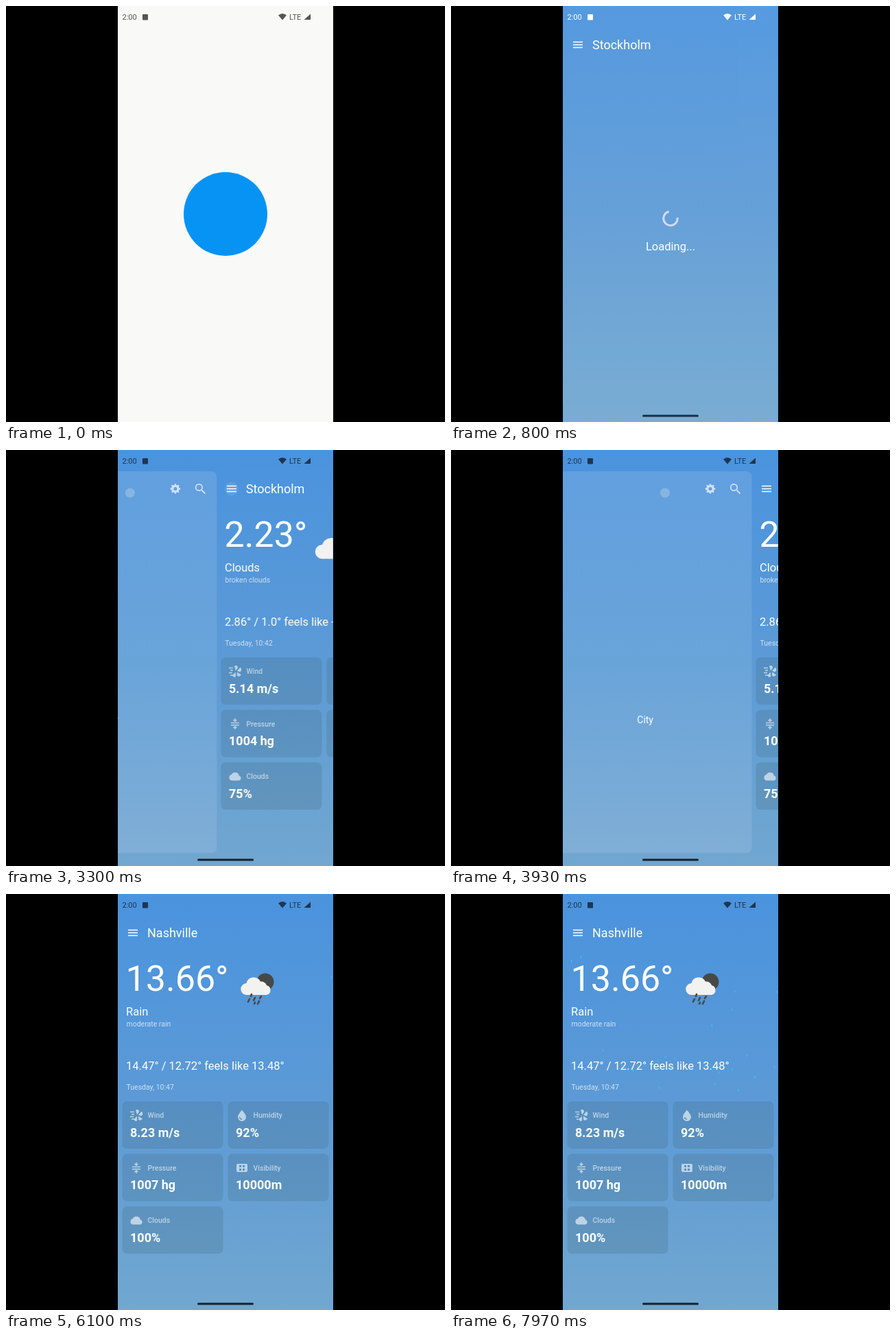
Write an HTML page that moves like this. It is 640 by 606 pixels and loops after 8000 ms.

```html
<!DOCTYPE html>
<html lang="en">
<head>
<meta charset="utf-8">
<title>Weather app</title>
<style>
html, body { margin: 0; width: 100%; height: 100%; overflow: hidden; background: #000; }
svg { display: block; width: 640px; height: 606px; font-family: Roboto, sans-serif; }
.title { font-size: 18px; fill: #fff; }
.temp { font-size: 52px; fill: #fff; }
.body { font-size: 16.5px; fill: #fff; }
.small { font-size: 10.5px; fill: #cfe1f3; }
.label { font-size: 10.5px; font-weight: 500; fill: #bdd3e6; }
.value { font-size: 18px; font-weight: 700; fill: #fff; }
.icon { fill: #bdd3e6; stroke: #bdd3e6; stroke-width: 0; }
.line { fill: none; stroke-width: 1.5; }
.card { fill: rgba(70, 110, 130, .25); }

svg * { animation: 8s linear infinite; }
#logo { animation-name: logo; }
@keyframes logo { 0%, 5.05% { opacity: 1; animation-timing-function: cubic-bezier(.15, 0, 1, 1); } 6.7%, 100% { opacity: 0; } }

#app { animation-name: rise; }
@keyframes rise {
  0%, 6.0875% { transform: translateY(6px); animation-timing-function: cubic-bezier(0, 0, .4, 1); }
  9.4125%, 100% { transform: none; }
}
#sky { animation-name: sky; }
@keyframes sky { 0%, 6% { opacity: 0; } 7.875% { opacity: .57; } 10.4%, 100% { opacity: 1; } }

#status { fill: #555; animation-name: tint; }
@keyframes tint { 0%, 6.1% { fill: #555; } 7.3%, 10.6% { fill: #fff; } 12.1%, 100% { fill: #1f3550; } }
#pill { animation-name: pill; }
@keyframes pill { 0%, 6.1% { opacity: 0; } 7.875% { opacity: .52; } 10.5%, 100% { opacity: 1; } }

#slide { animation-name: slide; }
@keyframes slide {
  0%, 40.1125% { transform: none; animation-timing-function: cubic-bezier(.4, 0, .2, 1); }
  43.3125%, 62.95% { transform: translateX(275px); animation-timing-function: cubic-bezier(.4, 0, .2, 1); }
  66.15%, 100% { transform: none; }
}
#ripple { animation-name: ripple; transform-origin: 185px 56.5px; }
@keyframes ripple {
  0%, 38.5% { opacity: 0; transform: scale(.4); }
  39.5% { opacity: .1; }
  44.1% { opacity: .1; transform: none; }
  49.1%, 100% { opacity: 0; transform: none; }
}

#loading, #cityA, #cityB, #dayA, #dayB, #dayA .sky, #dayB .sky { animation-timing-function: step-end; }
#loading { animation-name: loading; }
@keyframes loading { 0% { opacity: 1; } 25% { opacity: 0; } 63.2% { opacity: 1; } 72.5%, 100% { opacity: 0; } }
#cityA { animation-name: cityA; }
@keyframes cityA { 0% { opacity: 1; } 63.2%, 100% { opacity: 0; } }
#cityB { animation-name: cityB; }
@keyframes cityB { 0% { opacity: 0; } 63.2%, 100% { opacity: 1; } }
#dayA { animation-name: dayA; }
@keyframes dayA { 0% { opacity: 0; } 25% { opacity: 1; } 63.2%, 100% { opacity: 0; } }
#dayB { animation-name: dayB; }
@keyframes dayB { 0% { opacity: 0; } 72.5%, 100% { opacity: 1; } }
#dayA .sky { animation-name: iconA; }
@keyframes iconA { 0% { opacity: 0; } 30.375%, 100% { opacity: 1; } }
#dayB .sky { animation-name: iconB; }
@keyframes iconB { 0% { opacity: 0; } 75%, 100% { opacity: 1; } }
</style>
</head>
<body>
<svg viewBox="0 0 640 606">
  <defs>
    <clipPath id="phone"><rect x="163.5" width="313" height="606"/></clipPath>
    <linearGradient id="blue" x2="0" y2="1">
      <stop stop-color="#4a93de"/><stop offset=".5" stop-color="#5c9ad6"/><stop offset="1" stop-color="#71a7d0"/>
    </linearGradient>
    <linearGradient id="panel" x2="0" y2="1">
      <stop stop-color="#629fdf"/><stop offset=".5" stop-color="#69a4d9"/><stop offset="1" stop-color="#80aed6"/>
    </linearGradient>
    <radialGradient id="hole" gradientUnits="userSpaceOnUse" cx="320" cy="0" r="0">
      <stop offset=".8" stop-color="#f9f9f8" stop-opacity="0"/><stop offset="1" stop-color="#f9f9f8"/>
    </radialGradient>
  </defs>
  <rect width="640" height="606"/>
  <g clip-path="url(#phone)">
    <rect x="163" width="314" height="606" fill="#f9f9f8"/>
    <g id="app">
      <rect id="sky" x="163" width="314" height="606" fill="url(#blue)"/>
      <g id="slide">
        <g id="drawer">
          <path d="M-120 31H155.500a8 8 0 0 1 8 8V579a8 8 0 0 1-8 8H-120Z" fill="url(#panel)"/>
          <circle cx="37" cy="62.500" r="7" fill="#86b5e2"/>
          <path id="gear" fill="#cfe1f5" fill-rule="evenodd"/>
          <path d="M141.500 58.500l5 5" stroke="#cfe1f5" stroke-width="1.800"/>
          <circle cx="137.500" cy="54.500" r="4.700" fill="none" stroke="#cfe1f5" stroke-width="1.700"/>
          <text x="20" y="398" text-anchor="end" font-size="14" fill="#fff">City</text>
        </g>
        <circle id="ripple" cx="185" cy="56.500" r="14.500" fill="#fff"/>
        <path d="M178 52.500h14M178 56.500h14M178 60.500h14" stroke="#fff" stroke-width="1.600"/>
        <text id="cityA" class="title" x="206" y="62.500">Stockholm</text>
        <text id="cityB" class="title" x="206" y="62.500">Nashville</text>
        <g id="loading">
          <path id="spin" fill="none" stroke="#cfdcf6" stroke-width="3"/>
          <text class="body" x="320" y="356" text-anchor="middle">Loading...</text>
        </g>
        <g id="dayA"></g>
        <g id="dayB"></g>
      </g>
    </g>
    <rect x="163" width="314" height="606" fill="url(#hole)"/>
    <circle id="logo" cx="320" cy="303" r="61" fill="#0793f4"/>
    <rect id="pill" x="279" y="595.500" width="82" height="3" rx="1.500" fill="#14212e"/>
    <g id="status" font-size="11">
      <text x="169.500" y="20">2:00</text>
      <rect x="199" y="12" width="8" height="8.500" rx="1"/>
      <path d="M397 13.500Q403 8.500 409 13.500L403 20.500ZM444 11.500V20H434.500Z"/>
      <text x="413" y="20">LTE</text>
    </g>
  </g>
</svg>
<script>
const $ = id => document.getElementById(id);
const cloud = 'M-5 6A4.300 4.300 0 0 1-5.300-2.400A6 6 0 0 1 6-1A3.600 3.600 0 0 1 5.500 6Z';
const icons = {
  Wind: `<path class="line" d="M-9-5h6M-7-1.500h4M-9 2h5M-7 5.500h4"/>
    <path d="M1-1L-1-8Q4-10 4-5ZM3-1L8-6Q11-1 7 1ZM3 1L9 5Q6 9 3 6ZM1 1L1 8Q-4 9-3 5Z"/>`,
  Humidity: `<path d="M0-8C3-4 6-1 6 2.500A6 6 0 0 1-6 2.500C-6-1-3-4 0-8Z"/>
    <path class="line" style="stroke:#538cc0" d="M-3.500 2.500Q-3 5.500 0 5.800"/>`,
  Pressure: '<path class="line" d="M-6-1.500h12M-6 1.700h12M0-8v4M-2.500-6L0-3.700 2.500-6M0 8V4M-2.500 6L0 3.700 2.500 6"/>',
  Visibility: `<path fill-rule="evenodd" d="M-6-6H6Q8-6 8-4V4Q8 6 6 6H-6Q-8 6-8 4V-4Q-8-6-6-6Z
    M-4-4v3h3v-3ZM1-4v3h3v-3ZM-4 1v3h3v-3ZM1 1v3h3v-3Z"/>`,
  Clouds: `<path d="${cloud}"/>`
};
const skies = {
  broken: `<path d="M330 143a11 11 0 0 1 9-16a12 12 0 0 1 20 5a8 8 0 0 1-1 16Z" fill="#484848"/>
    <path d="M317 158.500a10.200 10.200 0 0 1 0-20.400A14 14 0 0 1 343 136a11.300 11.300 0 0 1 1 22.500Z" fill="#f2f2f0"/>`,
  rain: `<circle cx="378" cy="128" r="12.500" fill="#484848"/>
    <path d="M351 147a8.500 8.500 0 0 1-.5-17A11 11 0 0 1 371 127.500A9 9 0 0 1 380 133A7.200 7.200 0 0 1 380 147Z" fill="#f2f2f0"/>
    <path d="M358 146l-1 3M355 153l-2 4M363 151l-2 4M372 149l-2 3M363 158l-1 2M369 156l-2 4" stroke="#484848" stroke-width="2.600" stroke-linecap="round"/>`
};

function card(name, value, i) {
  const x = 169.5 + i % 2 * 154, y = 302 + (i >> 1) * 76.5;
  return `<g transform="translate(${x} ${y})"><rect class="card" width="147" height="69" rx="7"/>
    <g class="icon" transform="translate(20.500 20.500)">${icons[name]}</g>
    <text class="label" x="37" y="24">${name}</text>
    <text class="value" x="11.500" y="51.500">${value}</text></g>`;
}
function day(temp, kind, detail, feels, time, sky, values) {
  return `<text class="temp" x="174.500" y="140.500">${temp}</text><g class="sky">${skies[sky]}</g>
    <text class="body" x="175" y="177">${kind}</text><text class="small" x="175.500" y="193">${detail}</text>
    <text class="body" x="175" y="256">${feels}</text><text class="small" x="175.500" y="284.500">${time}</text>
    ${['Wind', 'Humidity', 'Pressure', 'Visibility', 'Clouds'].map((n, i) => card(n, values[i], i)).join('')}`;
}
$('dayA').innerHTML = day('2.23°', 'Clouds', 'broken clouds', '2.86° / 1.0° feels like -2.75°', 'Tuesday, 10:42',
  'broken', ['5.14 m/s', '86%', '1004 hg', '10000m', '75%']);
$('dayB').innerHTML = day('13.66°', 'Rain', 'moderate rain', '14.47° / 12.72° feels like 13.48°', 'Tuesday, 10:47',
  'rain', ['8.23 m/s', '92%', '1007 hg', '10000m', '100%']) + '<path id="drops" stroke="#22d8f4" fill="none"/>';

// Eight-toothed gear with a round hole
let teeth = '';
for (let i = 0; i < 32; i++) {
  const a = (i - .5) * Math.PI / 16, r = i % 4 < 2 ? 7.4 : 5.6;
  teeth += `${i ? 'L' : 'M'}${103 + r * Math.cos(a)} ${56.5 + r * Math.sin(a)}`;
}
$('gear').setAttribute('d', teeth + 'ZM105.500 56.500a2.500 2.500 0 1 0-5 0a2.500 2.500 0 1 0 5 0Z');

// cubic-bezier(x1, 0, x2, 1), clamped to 0..1
function ease(x, x1 = .4, x2 = .2) {
  let lo = 0, hi = 1;
  for (let i = 0; i < 20; i++) {
    const s = (lo + hi) / 2, r = 1 - s;
    if (3 * r * r * s * x1 + 3 * r * s * s * x2 + s ** 3 < x) lo = s; else hi = s;
  }
  return lo * lo * (3 - 2 * lo);
}
function spinner(ms, base) {
  const turn = Math.floor(ms / 1332), p = ms / 1332 - turn;
  const tail = 290 * ease(p * 2 - 1), head = 290 * ease(p * 2);
  const from = base + turn * 216 + p * 286 + tail, to = from + Math.max(head - tail, 14);
  const at = deg => {
    const a = deg * Math.PI / 180;
    return `${320 + 10.2 * Math.cos(a)} ${309.5 + 10.2 * Math.sin(a)}`;
  };
  $('spin').setAttribute('d', `M${at(from)}A10.2 10.2 0 ${to - from > 180 ? 1 : 0} 1 ${at(to)}`);
}
// Linear bezier control points, both axes: the splash opens from the top centre
function reveal(ms) {
  $('hole').setAttribute('r', 782 * ease(ms / 266, 0, .4));
}

const rand = n => { const v = Math.sin(n * 127.1 + 11.7) * 43758.5453; return v - Math.floor(v); };
function rain(ms) {
  let d = '';
  for (let i = 0; i < 20; i++) {
    const age = ms / (900 + 700 * rand(i + 50)) - rand(i + 90);
    if (age < 0) continue;
    const fall = Math.floor(age), x = 164 + 312 * rand(i * 7 + fall * 31), y = 80 + (age - fall) * 210;
    d += `M${x.toFixed(1)} ${y.toFixed(1)}v3`;
  }
  $('drops').setAttribute('d', d);
}

let start;
function frame(now) {
  start ??= now;
  const t = (now - start) % 8000;
  reveal(t - 487);
  if (t < 2000) spinner(Math.max(0, t - 368), -100);
  else spinner(Math.max(0, t - 5084), -90);
  rain(t - 5800);
  requestAnimationFrame(frame);
}
requestAnimationFrame(frame);
</script>
</body>
</html>
```
